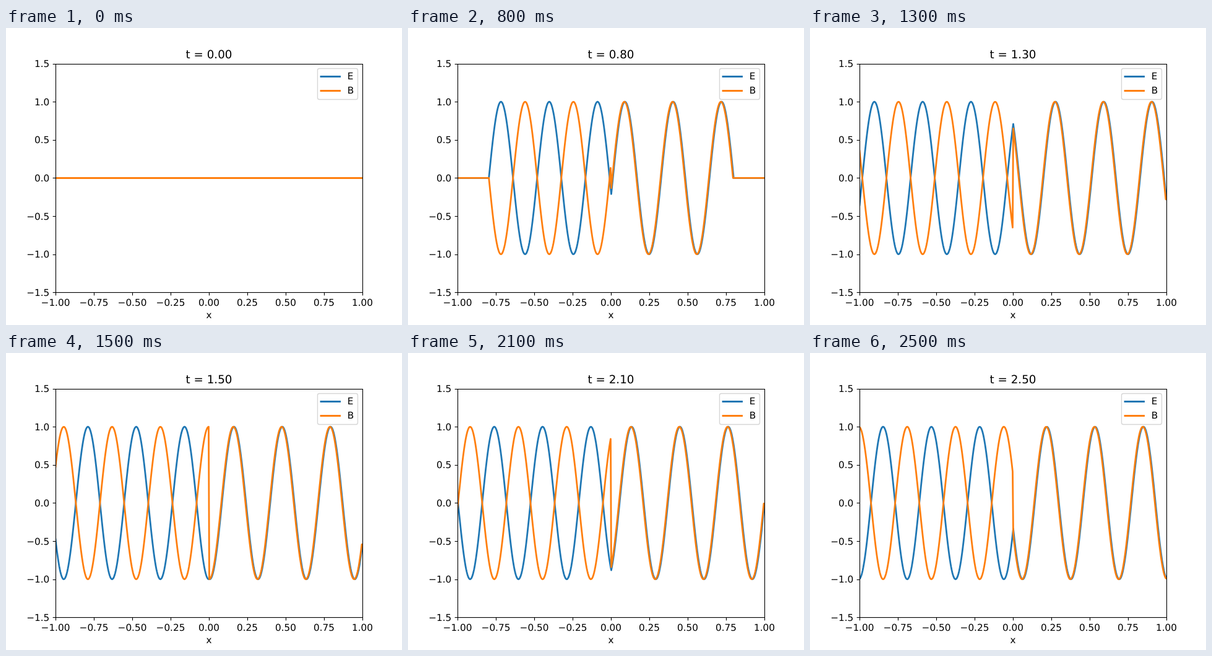
These frames come from a looping animation (640x480 px, 2600 ms). An HTML page:

```html
<!DOCTYPE html>
<html lang="en">
<head>
<meta charset="utf-8">
<title>E and B waves</title>
<style>
  html, body { margin: 0; width: 100%; height: 100%; overflow: hidden; background: #fff; }
  svg { display: block; width: 640px; height: 480px; }
  text {
    font: 15.28px "DejaVu Sans", sans-serif;
    fill: #000;
    text-rendering: geometricPrecision;
  }
  .mid { text-anchor: middle; }
  .end { text-anchor: end; }
  #title { font-size: 18.33px; }
  .axis { fill: none; stroke: #000; stroke-width: 1.11; }
  .wave { fill: none; stroke-width: 2.78; stroke-linejoin: round; stroke-linecap: square; }
  .e { stroke: #1f77b4; }
  .b { stroke: #ff7f0e; }
</style>
</head>
<body>
<svg viewBox="0 0 640 480">
  <clipPath id="plot"><rect x="80" y="58" width="496" height="369"/></clipPath>
  <g clip-path="url(#plot)">
    <path id="e" class="wave e"/>
    <path id="b" class="wave b"/>
  </g>
  <g id="axes">
    <rect class="axis" x="80.5" y="58.5" width="496" height="369"/>
  </g>
  <text class="mid" x="328" y="469">x</text>
  <text class="mid" id="title" x="328" y="49">t = 0.00</text>
  <rect x="503.5" y="65.5" width="65" height="50" rx="3" fill="#fff" fill-opacity=".8"
        stroke="#ccc" stroke-opacity=".8" stroke-width="1.39"/>
  <path class="wave e" d="M509 78.5H539.6"/>
  <path class="wave b" d="M509 101.5H539.6"/>
  <text x="551.8" y="83">E</text>
  <text x="551.8" y="106">B</text>
</svg>
<script>
  const N = 500, MID = 250, DT = 0.004, K = 20;
  const STEP_MS = 100, STEPS = 26;
  const $ = id => document.getElementById(id);

  function add(tag, attrs, text = '') {
    const el = document.createElementNS('http://www.w3.org/2000/svg', tag);
    for (const key in attrs) el.setAttribute(key, attrs[key]);
    el.textContent = text;
    $('axes').append(el);
  }

  const label = (v, digits) => v.toFixed(digits).replace('-', '\u2212');

  for (let i = 0; i <= 8; i++) {
    const x = 80 + 62 * i;
    add('path', { class: 'axis', d: `M${x + 0.5} 427.5v4.86` });
    add('text', { class: 'mid', x, y: 449 }, label(i / 4 - 1, 2));
  }
  for (let i = 0; i <= 6; i++) {
    const y = 57.6 + 61.6 * i;
    add('path', { class: 'axis', d: `M80.5 ${Math.round(y) + 0.5}h-4.86` });
    add('text', { class: 'end', x: 70.3, y: Math.round(y + 5.6) }, label(1.5 - i / 2, 1));
  }

  const pulse = t => t > 0 ? Math.sin(K * t) : 0;

  // Staggered grid: each cell away from the emitter lags by one time step.
  const eField = (i, t) => pulse(t - DT * (1 + Math.abs(i - MID)));
  function bField(i, t) {
    if (i < MID) return -eField(i, t);
    return eField(Math.min(i, N - 2) + 1, t);
  }

  function curve(field, t) {
    const zero = t ? 242.4 : 242.5;
    let d = '';
    for (let i = 0; i < N; i++) {
      const x = 80 + 496 * i / (N - 1);
      const y = zero - 123.2 * field(i, t);
      d += (i ? 'L' : 'M') + x.toFixed(2) + ' ' + y.toFixed(2);
    }
    return d;
  }

  let shown = -1;
  function show(step) {
    if (step === shown) return;
    shown = step;
    const t = step / 10;
    $('e').setAttribute('d', curve(eField, t));
    $('b').setAttribute('d', curve(bField, t));
    $('title').textContent = `t = ${t.toFixed(2)}`;
  }

  const start = performance.now();
  function tick(now) {
    show(Math.floor(Math.max(0, now - start) / STEP_MS) % STEPS);
    requestAnimationFrame(tick);
  }
  show(0);
  requestAnimationFrame(tick);
</script>
</body>
</html>
```
